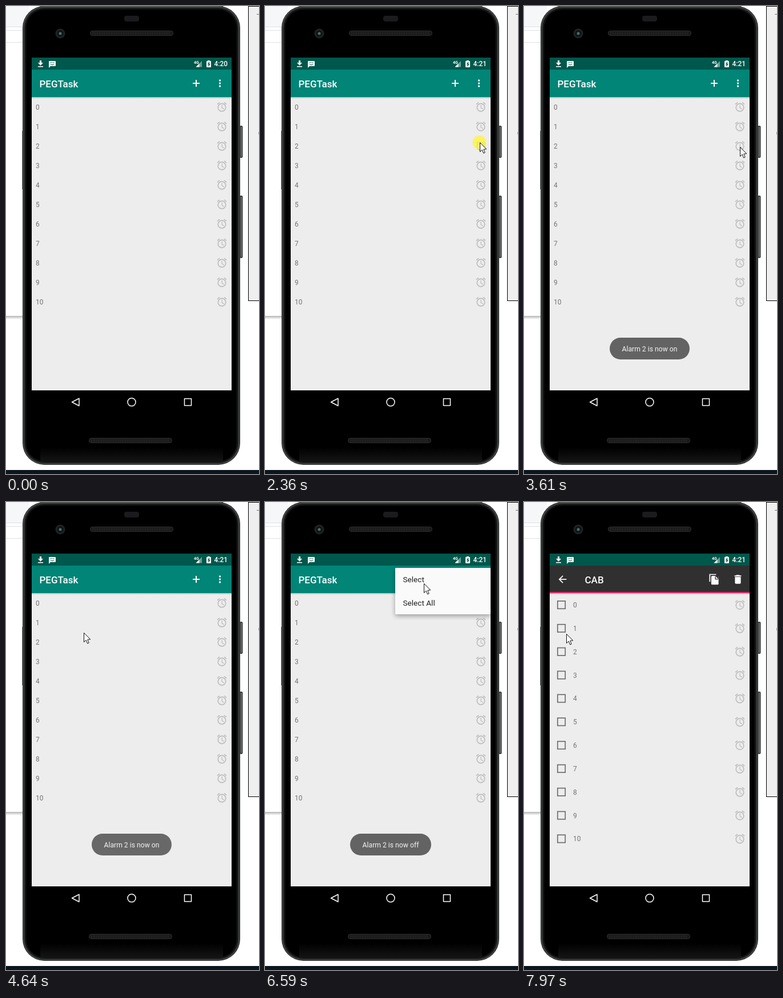
Animation, 443 px wide and 817 px high, one loop 8000 ms. Source, as an HTML page with a canvas:

```html
<!DOCTYPE html>
<html lang="en">
<head>
<meta charset="utf-8">
<title>Alarm list</title>
<style>
html, body { margin: 0; width: 443px; height: 817px; overflow: hidden; background: #fff; }
canvas { display: block; }
</style>
</head>
<body>
<canvas id="stage" width="443" height="817"></canvas>
<script>
const LOOP = 8000, ROWS = 11, W = 443, H = 817;
const page = document.getElementById('stage').getContext('2d');
const layer = new OffscreenCanvas(W, H).getContext('2d');
let g = page;

// Cursor glides: start, end, and the point reached
const glides = [
  [0, 110, 82, 800], [110, 880, 167, 175], [950, 1190, 383, 176],
  [1340, 1560, 333, 200], [1560, 1810, 376, 233], [1990, 2360, 376, 238],
  [2680, 2980, 378, 246], [3990, 4310, 98, 244], [4480, 5170, 377, 131],
  [5720, 6360, 278, 142], [6590, 6740, 273, 142],
  [7440, 7740, 92, 262], [7740, 7960, 74, 230]
];
const clicks = [2310, 3440, 5250, 6740];

const clamp = v => Math.max(0, Math.min(1, v));
const ramp = (t, from, span) => clamp((t - from) / span);
const smooth = v => v * v * (3 - 2 * v);

function rect(x, y, w, h, color) {
  g.fillStyle = color;
  g.fillRect(x, y, w, h);
}

function round(x, y, w, h, r, color) {
  g.beginPath();
  g.roundRect(x, y, w, h, r);
  g.fillStyle = color;
  g.fill();
}

function disc(x, y, r, color) {
  g.beginPath();
  g.arc(x, y, r, 0, 7);
  g.fillStyle = color;
  g.fill();
}

function ring(x, y, r, color, width) {
  g.beginPath();
  g.arc(x, y, r, 0, 7);
  g.strokeStyle = color;
  g.lineWidth = width;
  g.stroke();
}

function box(x, y, size, color, width) {
  g.strokeStyle = color;
  g.lineWidth = width;
  g.strokeRect(x - size / 2, y - size / 2, size, size);
}

function trace(...pts) {
  g.beginPath();
  pts.forEach(p => g.lineTo(...p));
}

function poly(color, ...pts) {
  trace(...pts);
  g.closePath();
  g.fillStyle = color;
  g.fill();
}

function line(color, width, ...pts) {
  trace(...pts);
  g.strokeStyle = color;
  g.lineWidth = width;
  g.stroke();
}

function text(s, x, y, size, color, weight = 400, align = 'left') {
  g.font = `${weight} ${size}px Roboto, sans-serif`;
  g.textAlign = align;
  g.fillStyle = color;
  g.fillText(s, x, y);
}

function at(x, y, scale, draw) {
  g.save();
  g.translate(x, y);
  g.scale(scale, scale);
  draw();
  g.restore();
}

function blend(y0, y1, from, to) {
  const grad = g.createLinearGradient(0, y0, 0, y1);
  grad.addColorStop(0, from);
  grad.addColorStop(1, to);
  return grad;
}

// Draws a group on its own layer, so that its parts fade as one
function faded(alpha, draw) {
  if (alpha <= 0) return;
  g = layer;
  g.clearRect(0, 0, W, H);
  draw();
  g = page;
  g.globalAlpha = alpha;
  g.drawImage(layer.canvas, 0, 0);
  g.globalAlpha = 1;
}

function desktop() {
  rect(0, 0, W, H, '#fff');
  rect(0, 0, 40, 36, '#f6f7f9');
  [36, 42, 63].forEach(y => rect(0, y, 40, 1, '#dfe0e3'));
  rect(0, 541, 40, 6, blend(541, 547, '#b4b4b4', '#fff'));
  rect(424, 0, 19, 515, '#000');
  rect(425, 1, 18, 513, '#efefef');
  rect(439, 14, 4, 1, '#777');
  rect(442, 220, 1, 4, '#999');
  rect(0, 810, W, 7, '#0a151d');
}

function speaker(x, y) {
  round(x, y, 146, 9, 4.5, '#303030');
  round(x + 1, y + 1, 144, 7, 3.5, '#181818');
  for (let i = 4; i < 142; i += 3) rect(x + i, y + 2, 1, 5, '#2b2b2b');
}

function sideKey(y, h) {
  round(409, y, 5.5, h, 2, '#3a3d3c');
  rect(411, y + 2, 1.5, h - 4, '#7b7f7e');
}

function phone() {
  sideKey(209, 56);
  sideKey(331, 109);
  rect(28, 218, 2, 102, '#777');
  ['#2a2c2b', '#4a4d4c', '#1e201f', '#171717', '#0a0a0a', '#000'].forEach((color, i) => {
    const d = i * 1.4;
    round(29 + d, d, 381 - 2 * d, 801 - 2 * d, 38 - d, color);
  });
  rect(60, 0, 320, 1, '#666');
  rect(60, 770, 320, 25, blend(770, 795, '#000', '#141414'));
  disc(95, 48, 8.5, '#202322');
  disc(95, 48, 5.5, '#0c1514');
  disc(95, 48, 2.5, '#4a6f69');
  round(207, 17, 26, 10, 4, '#1b1b1e');
  speaker(147, 43);
  speaker(145, 754);
}

function navBar() {
  rect(45, 671, 350, 40, '#000');
  g.lineJoin = 'round';
  line('#fff', 1.5, [128, 691.5], [128, 685], [115.5, 691.5], [128, 698], [128, 691.5]);
  ring(220, 691.5, 7, '#fff', 1.5);
  box(318.5, 691.5, 12, '#fff', 1.5);
  g.lineJoin = 'miter';
}

function statusBar(t) {
  const base = '#00574b', ink = '#fff';
  rect(45, 90, 350, 21, base);
  rect(59, 95, 3, 5, ink);
  poly(ink, [56, 99], [65, 99], [60.5, 104]);
  rect(56, 105, 9, 1.5, ink);
  round(75, 96, 12, 9, 1, ink);
  poly(ink, [75, 103], [75, 108], [78, 105]);
  for (let x = 78; x < 84; x += 2.5) rect(x, 98, 1.2, 1.5, base);
  line(base, 1, [78, 101.5], [81, 103], [84, 101.5]);
  text('4G', 329, 100.5, 7, ink, 700);
  poly('#6f9f97', [343, 96], [343, 106.5], [332.5, 106.5]);
  poly(ink, [338.5, 100.5], [338.5, 106.5], [332.5, 106.5]);
  rect(353, 95, 4, 2, ink);
  round(351, 96, 8, 11, 1, ink);
  line(base, 1.5, [356, 98], [354, 101.5], [356.5, 101.5], [354.5, 105]);
  text(t < 420 ? '4:20' : '4:21', 388, 105, 11.9, ink, 500, 'right');
}

function appBar() {
  rect(45, 111, 350, 48, '#008577');
  text('PEGTask', 58.5, 142, 17, '#fff', 500);
  rect(327, 134, 12, 2, '#fff');
  rect(332, 129, 2, 12, '#fff');
  [130, 135, 140].forEach(y => disc(374.5, y, 1.7, '#fff'));
}

function actionBar() {
  const ink = '#fff', base = '#303030';
  rect(45, 111, 350, 46, base);
  rect(45, 157, 350, 2, '#e91e63');
  text('CAB', 106.5, 142, 17, ink, 500);
  at(67.5, 135, 0.85, () => {
    line(ink, 2, [8, 0], [-7, 0]);
    line(ink, 2, [0.7, -7.3], [-6.6, 0], [0.7, 7.3]);
  });
  at(333, 135, 0.85, () => {
    line(ink, 2, [4, -10], [-9, -10], [-9, 5]);
    round(-6, -7, 15, 18, 2, ink);
    poly(base, [2, -7], [9, -7], [9, 0]);
    poly(ink, [2, -7], [2, 0], [9, 0]);
    line(base, 1.5, [2.5, -6], [2.5, -0.5], [8, -0.5]);
  });
  at(374.5, 135, 0.85, () => {
    round(-6, -5, 12, 14, [0, 0, 2, 2], ink);
    rect(-7, -8, 14, 2, ink);
    rect(-3.5, -9, 7, 2, ink);
  });
}

function alarm(x, y) {
  const ink = '#bdbdbd';
  at(x, y, 0.85, () => {
    ring(0, 1, 8, ink, 2);
    line(ink, 1.5, [0.2, -4], [0.2, 1.8], [4.5, 4.4]);
    [-1, 1].forEach(s => line(ink, 2, [s * 9.4, -5.5], [s * 4.8, -9.4]));
  });
}

function list(picking) {
  rect(45, 159, 350, 512, '#ededed');
  const top = picking ? 179.6 : 176.3, gap = picking ? 40.83 : 34;
  for (let i = 0; i < ROWS; i++) {
    const y = top + gap * i;
    if (picking) box(65.5, y, 13.4, '#6e6e6e', 1.7);
    text(i, picking ? 86 : 52, Math.round(y + 4.5), 11.9, '#737373');
    alarm(378, y);
  }
  rect(45, 159, 350, 3, blend(159, 162, 'rgba(0,0,0,.22)', 'rgba(0,0,0,0)'));
}

function menu(t) {
  const open = smooth(ramp(t, 5540, 220));
  faded(open * (1 - ramp(t, 7040, 170)), () => {
    const w = 167 * (0.5 + open / 2), h = 81 * (0.3 + 0.7 * open);
    g.save();
    g.beginPath();
    g.rect(220, 111, 175, 95);
    g.clip();
    g.shadowColor = 'rgba(0,0,0,.35)';
    g.shadowBlur = 8;
    g.shadowOffsetY = 3;
    round(395 - w, 115, w, h, 1, '#fafafa');
    g.shadowColor = 'transparent';
    g.clip();
    ['Select', 'Select All'].forEach((s, i) => text(s, 241.5, 140 + 41 * i, 13.6, '#212121'));
    g.restore();
  });
}

function toast(t, label, from) {
  faded(ramp(t, from, 300) - ramp(t, from + 1970, 250), () => {
    g.font = '400 12.2px Roboto, sans-serif';
    const w = Math.round(g.measureText(label).width) + 43;
    round(220 - w / 2, 579, w, 38, 19, '#636363');
    text(label, 220, 603, 12.2, '#f4f4f4', 400, 'center');
  });
}

function cursor(t) {
  const i = glides.findLastIndex(m => t >= m[0]);
  if (i < 1) return;
  const [from, to, ...end] = glides[i];
  const p = smooth(ramp(t, from, to - from));
  const [x, y] = glides[i - 1].slice(2).map((v, k) => Math.round(v + (end[k] - v) * p));
  if (clicks.some(c => t >= c && t < c + 170)) disc(x - 0.5, y, 12, 'rgba(255,245,50,.72)');
  at(x + 0.5, y + 0.5, 1, () => {
    poly('#fff', [0, 0], [0, 16], [3.7, 12.6], [6.2, 18.5], [8.7, 17.4], [6.3, 11.7], [11.3, 11.3]);
    g.strokeStyle = '#111';
    g.lineWidth = 1;
    g.stroke();
  });
}

function frame(t) {
  desktop();
  phone();
  list(t >= 7060);
  statusBar(t);
  appBar();
  faded(ramp(t, 7180, 260), actionBar);
  navBar();
  toast(t, 'Alarm 2 is now on', 2660);
  toast(t, 'Alarm 2 is now off', 4890);
  menu(t);
  cursor(t);
}

const start = performance.now();
function tick() {
  frame((performance.now() - start) % LOOP);
  requestAnimationFrame(tick);
}
tick();
</script>
</body>
</html>
```
